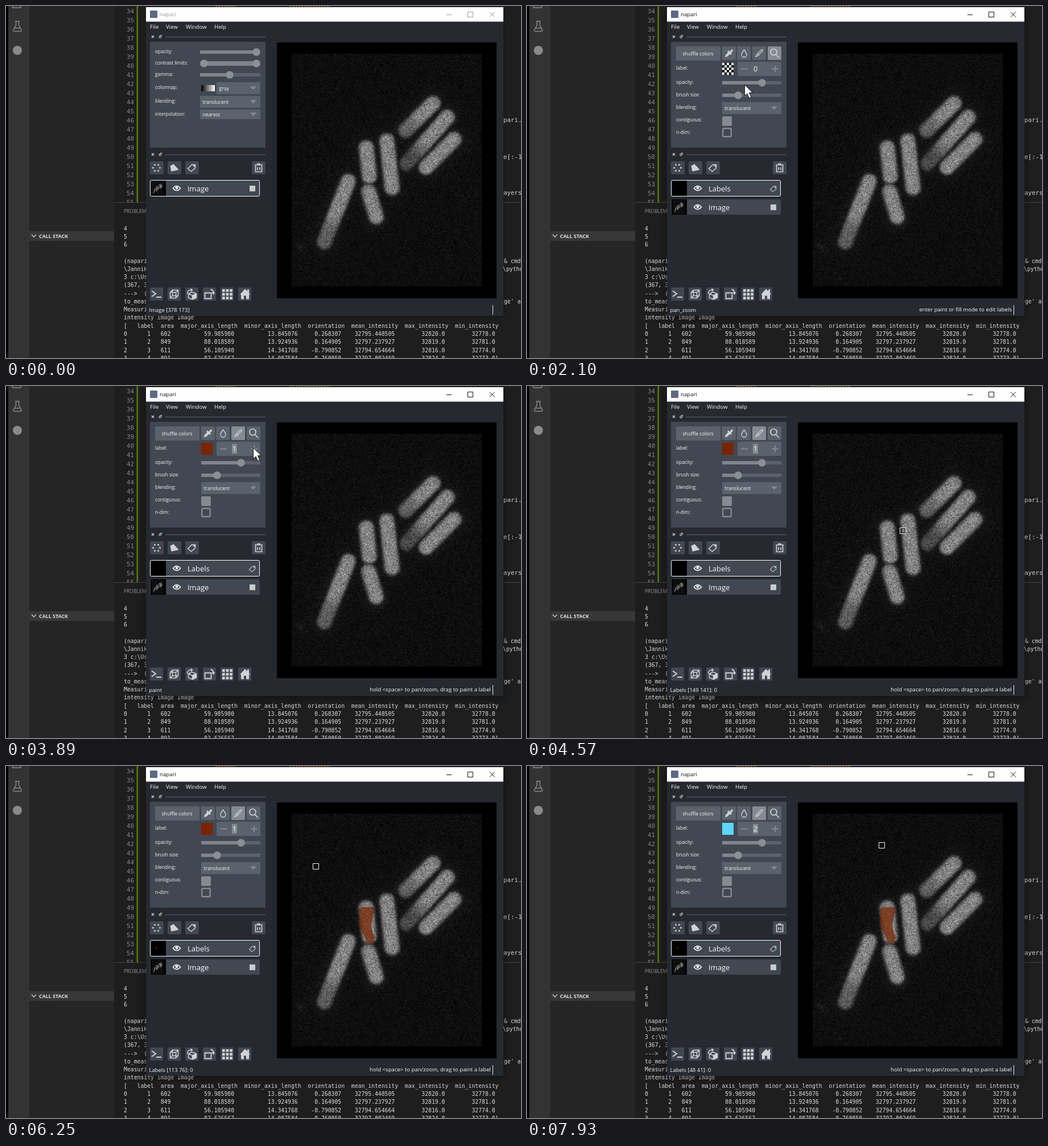
An HTML page with a canvas that plays this animation: 905x619 px, repeating every 8 s.

```html
<!DOCTYPE html>
<html lang="en">
<head>
<meta charset="utf-8">
<title>Painting labels</title>
<style>
html, body { margin: 0; width: 100%; height: 100%; overflow: hidden; background: #1e1e1e; }
canvas { display: block; }
</style>
</head>
<body>
<canvas id="stage" width="905" height="619"></canvas>
<script>
const ctx = document.getElementById('stage').getContext('2d');
const LOOP = 8000, STEP = 76, PX = 1.115;
const UI = '"Open Sans", "Noto Sans", sans-serif', MONO = '"DejaVu Sans Mono", monospace';
const C = { win: '#262930', panel: '#414851', btn: '#5a626c', hover: '#6d747d', on: '#868b93', text: '#f8f8f8', icon: '#d1d2d4', term: '#dcdcdc' };
const T = { enter: 200, focus: 1260, labels: 1820, paint: 3190, one: 3890, press: 5100, stroke: 5260, release: 6085, two: 7300 };

const linear = k => k, easeIn = k => k * k, easeOut = k => 1 - (1 - k) ** 2, smooth = k => k * k * (3 - 2 * k);
const clamp = (v, a = 0, b = 1) => Math.max(a, Math.min(b, v));

// Pointer moves along quadratic curves: begin, end, easing, control point, goal
const ORIGIN = [609, 566];
const MOVES = [
  [T.enter, 950, linear, [462, 512], [327, 278]],
  [T.labels, 2350, easeOut, [372, 150], [405, 94]],
  [2590, 2880, smooth, [406, 91], [407, 88]],
  [3050, 3660, smooth, [412, 100], [434, 108]],
  [4040, 4579, easeOut, [655, 155], [660, 254]],
  [4579, 5110, easeOut, [645, 248], [631, 254]],
  [T.stroke, 5645, smooth, [618.5, 264], [641, 305]],
  [5645, 6030, linear, [631, 282], [640, 254]],
  [6090, 6860, easeOut, [490, 130], [431, 95]],
  [6940, 7470, easeOut, [432, 96], [434, 108]],
  [7620, 7930, easeIn, [544, 149], [623, 139]]];

// Time held at the last screen update
function snap(t) {
  const m = MOVES.filter(m => m[0] <= t).pop();
  if (!m) return 0;
  const [a, z] = m, n = Math.round((z - a) / STEP), dt = (z - a) / n;
  return a + dt * Math.min(n, Math.floor((t - a) / dt + 0.25));
}

function pointer(t) {
  const i = MOVES.findLastIndex(m => m[0] <= t);
  if (i < 0) return null;
  const [a, z, ease, c, goal] = MOVES[i], from = i ? MOVES[i - 1][4] : ORIGIN;
  const u = ease(clamp((t - a) / (z - a))), v = 1 - u;
  return from.map((f, j) => v * v * f + 2 * u * v * c[j] + u * u * goal[j]);
}

const inside = (p, x, y, w, h) => !!p && p[0] >= x && p[0] < x + w && p[1] >= y && p[1] < y + h;
const onCanvas = p => inside(p, 476, 64, 386, 450);

// Drawing helpers
function rect(x, y, w, h, color, r = 0) {
  ctx.fillStyle = color;
  ctx.beginPath();
  ctx.roundRect(x, y, w, h, r);
  ctx.fill();
}
function frame(x, y, w, h, color, lw = 1, r = 0) {
  ctx.strokeStyle = color;
  ctx.lineWidth = lw;
  ctx.beginPath();
  ctx.roundRect(x, y, w, h, r);
  ctx.stroke();
}
function disc(x, y, r, color) {
  ctx.fillStyle = color;
  ctx.beginPath();
  ctx.arc(x, y, r, 0, 7);
  ctx.fill();
}
function text(s, x, y, size, color = C.text, font = UI, align = 'left', weight = '') {
  ctx.font = `${weight} ${size}px ${font}`;
  ctx.fillStyle = color;
  ctx.textAlign = align;
  ctx.fillText(s, x, y + size * 0.36);
}
function line(d, x, y, color = C.icon, lw = 1.3) {
  ctx.save();
  ctx.translate(x, y);
  ctx.strokeStyle = color;
  ctx.lineWidth = lw;
  ctx.stroke(new Path2D(d));
  ctx.restore();
}
function solid(d, x, y, color = C.icon) {
  ctx.save();
  ctx.translate(x, y);
  ctx.fillStyle = color;
  ctx.fill(new Path2D(d));
  ctx.restore();
}
function layer(w, h) {
  const c = document.createElement('canvas');
  c.width = w;
  c.height = h;
  return c;
}

// Microscope picture: rods from one cap centre to the other, some dim at the first cap
const ROD = 14;
const RODS = [
  { a: [559, 414], b: [601, 308], dim: 0.68 },
  { a: [633, 249], b: [638, 299], dim: 1 },
  { a: [669, 237], b: [678, 319], dim: 1 },
  { a: [637, 326], b: [650, 370], dim: 1 },
  { a: [702, 218], b: [750, 171], dim: 0.7 },
  { a: [704, 276], b: [775, 195], dim: 0.5 },
  { a: [738, 283], b: [787, 234], dim: 1 }];

function makeCells() {
  const w = 300, h = 367, c = layer(w, h), g = c.getContext('2d'), img = g.createImageData(w, h);
  let seed = 7;
  const rnd = () => (seed = (seed * 16807) % 2147483647) / 2147483647;
  for (let i = 0; i < w * h; i++) {
    const x = 502 + (i % w) * PX, y = 84 + Math.floor(i / w) * PX;
    let v = 14 + 20 * Math.exp(-Math.hypot(x - 518, y - 424) / 5);
    for (const { a, b, dim } of RODS) {
      const dx = b[0] - a[0], dy = b[1] - a[1];
      const u = clamp(((x - a[0]) * dx + (y - a[1]) * dy) / (dx * dx + dy * dy));
      const d = Math.hypot(x - a[0] - u * dx, y - a[1] - u * dy);
      const tone = 118 * (dim + (1 - dim) * smooth(clamp(u * 2.4 - 0.3)));
      v = Math.max(v, 14 + tone / (1 + Math.exp((d - ROD + 1) / 1.7)), 14 + 12 * Math.exp((ROD - d) / 9));
    }
    v += (rnd() + rnd() + rnd() - 1.5) * (10 + v * 0.4);
    img.data.set([v, v, v, 255], i * 4);
  }
  g.putImageData(img, 0, 0);
  return c;
}
const cells = makeCells();
const paint = layer(334, 409), brush = paint.getContext('2d');

function paintStroke(until) {
  brush.clearRect(0, 0, 334, 409);
  brush.fillStyle = '#7a2400';
  for (let t = T.stroke - 6; t <= Math.min(until, 6030); t += 6) {
    const [x, y] = pointer(t);
    brush.fillRect(Math.round(x - 508), Math.round(y - 90), 12, 12);
  }
}

// Editor behind the window
const TERM = `4
5
6

(napari
\\Jannik
3 c:\\Us
(367, 3
--->  (
to_meas
Measuri
intensity image Image
[   label  area  major_axis_length  minor_axis_length  orientation  mean_intensity  max_intensity  min_intensity
0       1   602          59.985980          13.845076     0.268307    32795.448505        32820.0        32778.0
1       2   849          88.018589          13.924936     0.164905    32797.237927        32819.0        32781.0
2       3   611          56.105940          14.341768    -0.790852    32794.654664        32816.0        32774.0
3       4   891          82.626567          14.087584    -0.760850    32797.802469        32824.0        32773.0]`.split('\n');
const termY = i => 391 + i * 14.27;

// Right-align each value one character short of its heading
function alignRow(s) {
  const ends = [...TERM[12].matchAll(/\w+/g)].map(m => m.index + m[0].length - 1);
  return s.split(/ +/).reduce((out, v, i) => out + v.padStart(ends[i - 1] - out.length + v.endsWith(']')));
}

function drawEditor() {
  const grey = '#8a8a8a', code = '#d4d4d4';
  rect(0, 0, 905, 619, '#1e1e1e');
  rect(0, 0, 4, 619, '#000');
  rect(4, 0, 37, 619, '#333333');
  rect(41, 0, 149, 619, '#252526');
  line('M-8-4V2Q-8 4-6 4H5Q7 4 7 2V-4M1-4V0H8', 19, -1, grey, 1.5);
  line('M-4-9H4M-2.5-9V-2L-7 6Q-7.500 8.500-5 8.500H5Q7.500 8.500 7 6L2.500-2V-9M-5 3H5', 20, 36, grey, 1.5);
  disc(20, 78, 8, grey);
  rect(41, 396, 149, 17, '#383838');
  line('M-4-2L0 2L4-2', 49, 404, '#d0d0d0', 1.3);
  text('CALL STACK', 58, 404.8, 8.9, '#e2e2e2', UI, 'left', 'bold');
  for (let i = 0; i < 22; i++) text(34 + i, 212, 9 + i * 16, 10.8, '#858585', MONO);
  rect(229.5, 0, 2.5, 345, '#5b7d0d');
  ctx.setLineDash([3, 2]);
  line('M368 0H404M499 0H570', 0, 0.5, '#b8912a', 1);
  ctx.setLineDash([]);
  text('pari.', 874, 200, 10.8, code, MONO);
  text('e[:-1', 874, 265, 10.8, code, MONO);
  text('ayers', 874, 328, 10.8, code, MONO);
  rect(190, 345, 715, 274, '#1e1e1e');
  rect(190, 345, 715, 1, '#444444');
  text('PROBLEMS', 207, 360.5, 8.5, '#969696');
  TERM.forEach((s, i) => text(i > 12 ? alignRow(s) : s, 207, termY(i), 9.77, C.term, MONO));
  text('& cmd', 875, termY(4), 9.77, C.term, MONO);
  text('\\python', 873, termY(5), 9.77, C.term, MONO);
  text("age' a", 869, termY(9), 9.77, C.term, MONO);
}

function drawWindow(active) {
  ctx.save();
  ctx.shadowColor = active ? 'rgba(0,0,0,.45)' : 'rgba(0,0,0,.25)';
  ctx.shadowBlur = active ? 16 : 8;
  ctx.shadowOffsetY = 3;
  rect(246, 2, 628, 543, C.win);
  ctx.restore();
  rect(246, 2, 628, 25.5, '#ffffff');
  rect(253, 8, 13, 13, '#5d6b84', 1);
  const ink = active ? '#111' : '#999';
  text('napari', 270, 15, 9.7, ink);
  line('M774 15.500H783M811.500 10.500H820.500V19.500H811.500ZM850 10.500L859 19.500M859 10.500L850 19.500', 0, 0, ink, 1);
  text('File', 253, 37, 9.7);
  text('View', 281, 37, 9.7);
  text('Window', 316, 37, 9.7);
  text('Help', 366, 37, 9.7);
  for (const y of [54, 261]) {
    line('M-2-2L2 2M2-2L-2 2', 258, y, C.icon, 1.2);
    line('M-2-1H1V2H-2ZM0-2.500H2.500V0', 271, y, C.icon, 1);
    rect(280, y, 176, 1, C.btn);
  }
  rect(253, 63, 203, 186, C.panel, 1);
  rect(476, 64, 386, 450, '#000');
  ctx.drawImage(cells, 502, 84, 334, 409);
}

function slider(x, y, from, to, handles, h = 6) {
  rect(x, y - h / 2, 447 - x, h, C.btn, 1);
  rect(from, y - h / 2, to - from, h, '#7e858d', 1);
  for (const hx of handles) disc(hx, y, 6.7, '#8b9097');
}
function combo(x, y, h, s) {
  rect(x, y, 447 - x, h, C.btn, 1);
  text(s, x + 4.5, y + h / 2, 8.7);
  solid('M-5.500-3H5.500L0 3Z', 434.5, y + h / 2, C.on);
}
function captions(names, top, gap) {
  names.split(',').forEach((s, i) => text(s + ':', 262, top + i * gap, 8.4));
}

function imageControls() {
  captions('opacity,contrast limits,gamma', 79.5, 20);
  captions('colormap,blending,interpolation', 143, 23.5);
  slider(341, 81, 341, 440, [440]);
  slider(341, 101, 348, 440, [348, 440], 8);
  slider(341, 121, 341, 393, [393]);
  const g = ctx.createLinearGradient(343, 0, 367, 0);
  g.addColorStop(0, '#000');
  g.addColorStop(1, '#fff');
  rect(343, 139, 24, 11, g);
  combo(370, 134, 21, 'gray');
  combo(341, 158, 21, 'translucent');
  combo(341, 182, 17, 'nearest');
}

function labelControls(p, mode, label) {
  rect(262, 71, 78, 25, C.btn, 2);
  text('shuffle colors', 300.5, 83.5, 8.6, C.text, UI, 'center');
  for (let i = 0; i < 4; i++) {
    const x = 343 + i * 26.8, over = inside(p, x, 71, 25, 25);
    rect(Math.floor(x), 71, 24, 24, i === mode ? C.on : over ? C.hover : C.btn, 2);
  }
  solid('M-7 7L-6 3L0-3L3 0L-3 6ZM-1-5L5 1L3 3L-3-3ZM1-2L4-6Q7-8 7-4L3 0Z', 355, 83);
  line('M0-6Q4.500 0 4.500 2.500A4.500 4.500 0 0 1-4.500 2.500Q-4.500 0 0-6Z', 381.5, 83);
  line('M-6 6L-5 3L4-6Q7-7 6-4L-3 5ZM-3 1L0 4', 408, 83);
  line('M4-2A5.500 5.500 0 1 1-7-2A5.500 5.500 0 1 1 4-2M2.500 2.500L8 8', 435, 83, C.icon, 1.7);
  captions('label', 108.5, 0);
  captions('opacity,brush size,blending,contiguous,n-dim', 134, 22);
  if (label) rect(343, 100, 20, 21, label === 1 ? '#7a2400' : '#5cd6ff');
  else for (let i = 0; i < 25; i++) rect(343 + (i % 5) * 4, 100 + Math.floor(i / 5) * 4.2, 4, 4.2, i % 2 ? '#000' : '#fff');
  rect(370, 98, 77, 25, C.btn, 2);
  line('M-6 0H6', 382, 110.5, C.on, 2);
  line('M-5.500 0H5.500M0-5.500V5.500', 436, 110.5, C.on, 2);
  if (label) rect(397, 102, 9, 17, C.on);
  text(String(label), 401.5, 110.5, 12.5, C.text, UI, 'center');
  slider(343, 135, 343, 413, [413]);
  slider(343, 157, 343, 371, [371]);
  combo(343, 169, 21, 'translucent');
  rect(343, 194, 17, 17, C.on, 2);
  frame(344.2, 215.2, 14.5, 14.5, C.on, 2.4, 2);
}

const TAG = 'M-7 2L0-5H6V1L-1 7ZM2.500-2.500A1 1 0 1 1 3.500-1.500';
function layerRow(y, name, selected) {
  rect(253, y, 193, 27, C.panel, 2);
  rect(254, y, 27, 27, '#000');
  ctx.drawImage(name === 'Image' ? cells : paint, 256, y + 1, 21, 25);
  if (name === 'Image') {
    rect(428, y + 9, 10, 10, '#c9cbce');
  } else {
    ctx.save();
    ctx.translate(433, y + 14);
    ctx.scale(0.8, 0.8);
    line(TAG, 0, 0);
    ctx.restore();
  }
  line('M-6.500 0Q0-8 6.500 0Q0 8-6.500 0Z', 300, y + 13.5, C.text, 1.6);
  disc(300, y + 13, 2.4, C.text);
  text(name, 319, y + 14.5, 13);
  if (selected) frame(253.5, y - 0.5, 192, 28, '#ffffff', 1, 2);
}

function drawButtons(p) {
  for (const x of [253, 284, 315, 432]) rect(x, 273, 24, 23, inside(p, x, 273, 24, 23) ? C.btn : C.panel, 2);
  for (let i = 0; i < 6; i++) rect(253 + i * 31, 495, 23, 23, C.panel, 2);
  for (let i = 0; i < 6; i++) disc(264.5 + 6 * Math.cos(i * 1.05), 284.5 + 6 * Math.sin(i * 1.05), 1.5, C.icon);
  solid('M-7-4L-1-7L8 3L-5 6Z', 295.5, 285);
  line(TAG, 326.5, 284, C.icon, 1.6);
  line('M-7-5H7M-2-5V-7H2V-5M-5.500-4V7H5.500V-4M-2-1V4M2-1V4', 444, 284.5, C.icon, 1.7);
  line('M-8-5L-1 0L-8 5M0 6H9', 264, 506, C.icon, 2);
  line('M-7-3L-3-7H7V3L3 7H-7ZM-7-3H3V7M3-3L7-7M-3-7V3H7M-7 7L-3 3', 295.5, 506.5, C.icon, 1.5);
  line('M0-3L8 0V7L1 10L-6 7V0ZM-6 0L1 3L8 0M1 3V10', 326.5, 506, C.icon, 1.4);
  solid('M1 3L8 0V7L1 10Z', 326.5, 506);
  line('M-8 0Q-8-7 0-7M-2-9L1-7L-2-4', 326.5, 506, C.icon, 1.4);
  line('M-8-2H3V8H-8ZM2-8Q7-8 7-1M5-3L7 0L9-3', 357.5, 506.5, C.icon, 1.8);
  for (let i = 0; i < 9; i++) rect(380 + (i % 3) * 6.6, 498 + Math.floor(i / 3) * 6.6, 4.7, 4.7, C.icon);
  solid('M-9 1L0-9L4-5V-8H7V-2L9 1H7V9H2V3H-2V9H-7V1Z', 420, 506.5);
}

function statusText(t, s, press) {
  if (t < 550) return 'Image [378 173]';
  if (t < T.labels) return 'Image [371 -21]';
  if (t < T.paint) return 'pan_zoom';
  const q = pointer(snap(s - 60));
  if (!onCanvas(q)) return 'paint';
  const row = Math.round((q[1] - 84) / PX), col = Math.round((q[0] - 502) / PX);
  return `Labels [${row} ${col}]: ${press ? 1 : 0}`;
}

function drawPointer(p, painting, press) {
  if (!p) return;
  const [x, y] = p.map(Math.round);
  if (painting && onCanvas(p)) {
    frame(x - 4.5, y - 4.5, 10, 10, '#fff');
    frame(x - 3.5, y - 3.5, 8, 8, '#000');
    if (press) disc(x + 0.5, y, 15.5, 'rgba(222,218,42,.7)');
    return;
  }
  const arrow = 'M.5.500V20L5 16L8.500 24L12 22.500L8.500 14.500H14.500Z';
  solid(arrow, x, y, '#fff');
  line(arrow, x, y, '#111', 1);
}

function draw(t) {
  const s = snap(t), p = pointer(s);
  const labels = t >= T.labels, painting = t >= T.paint, press = t >= T.press && t < T.release;
  const label = t >= T.two ? 2 : t >= T.one ? 1 : 0;
  paintStroke(press ? snap(s - 60) : s);
  drawEditor();
  drawWindow(t >= T.focus);
  ctx.globalAlpha = 0.7;
  ctx.drawImage(paint, 502, 84);
  ctx.globalAlpha = 1;
  if (labels) labelControls(p, painting ? 2 : 3, label);
  else imageControls();
  drawButtons(p);
  if (labels) layerRow(307, 'Labels', true);
  layerRow(labels ? 340 : 307, 'Image', !labels);
  text(statusText(t, s, press), 251.5, 535, 9.5);
  if (labels) {
    const hint = painting ? 'hold <space> to pan/zoom, drag to paint a label' : 'enter paint or fill mode to edit labels';
    text(hint, 852, 534, 9.6, C.text, UI, 'right');
  }
  rect(855, 526, 1, 17, '#e8e8e8');
  drawPointer(p, painting, press);
}

const start = performance.now();
function tick() {
  draw((performance.now() - start) % LOOP);
  requestAnimationFrame(tick);
}
tick();
</script>
</body>
</html>
```
